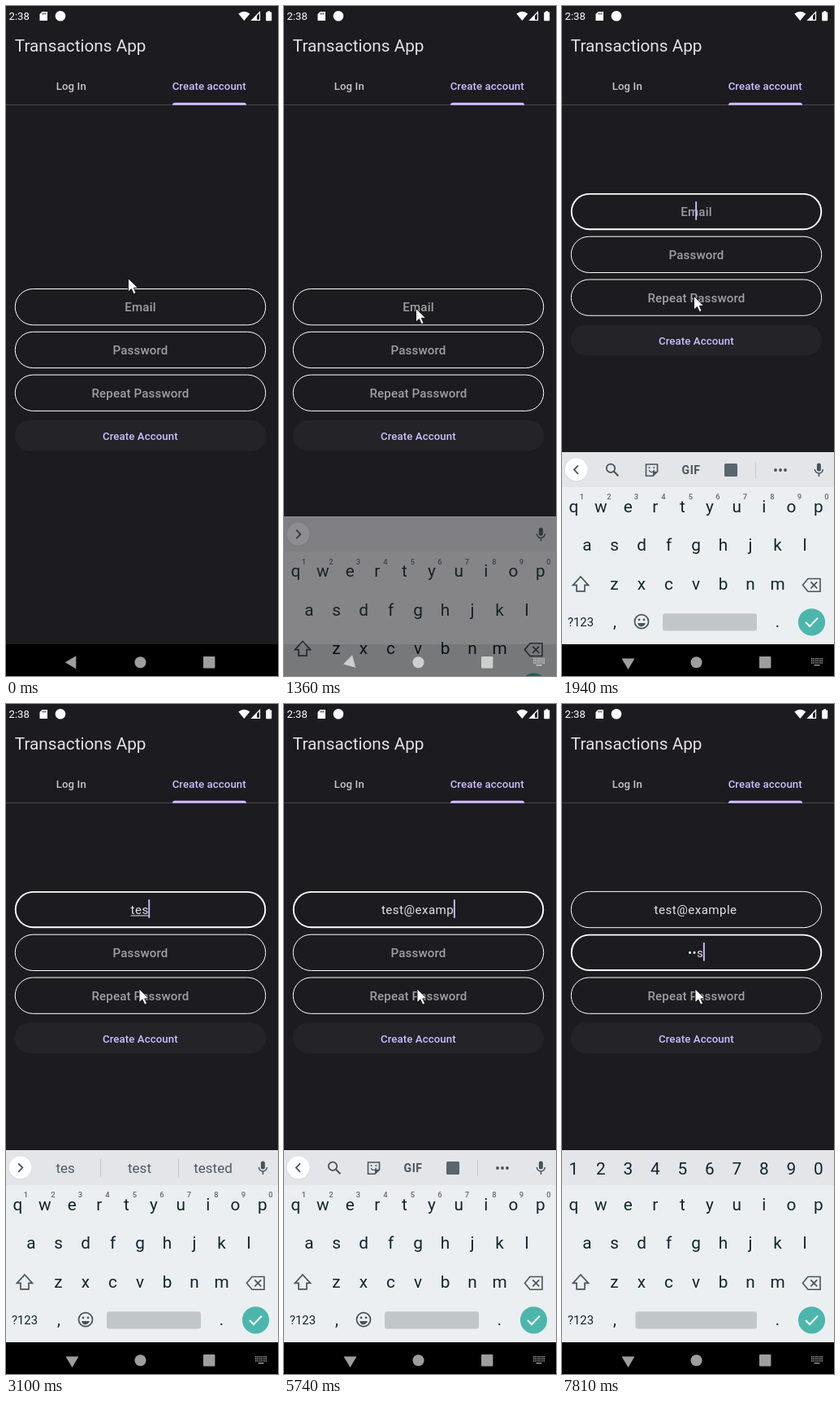
An HTML page with a canvas for the animation above (7.99 s loop, 335 px wide and 823 px high).

```html
<!DOCTYPE html>
<html lang="en">
<head>
<meta charset="utf-8">
<title>Create account</title>
<style>
html, body { margin: 0; width: 100%; height: 100%; overflow: hidden; background: #1c1b1f; }
canvas { display: block; width: 335px; height: 823px; }
</style>
</head>
<body>
<canvas id="stage"></canvas>
<script>
const W = 335, H = 823, LOOP = 7990;
const DP = 0.944;
const BG = '#1c1b1f', ACCENT = '#d0bcff', INK = '#10252e', ICON = '#46545b';
const NAV_TOP = 784, KB_TOP = 548;
const KB_START = 1300, FOCUS = 1630, PASS_FOCUS = 6570;

const canvas = document.getElementById('stage');
const ratio = window.devicePixelRatio || 1;
canvas.width = W * ratio;
canvas.height = H * ratio;
const c = canvas.getContext('2d');

const emailKeys = [2640, 2880, 3100, 3355, 4440, 4790, 5170, 5270, 5460, 5735, 5960, 6060];
const passKeys = [7370, 7530, 7805];
const EMAIL = 'test@example', PASS = 'tes';

const pointer = [
  [20, 150, 334], [400, 164, 368], [600, 168, 372], [780, 156, 364],
  [830, 152, 360], [1150, 162, 371], [1640, 162, 371],
  [1940, 162, 356], [2040, 163.5, 349.5]
];

const ramp = (t, a, b) => Math.min(1, Math.max(0, (t - a) / (b - a)));
const typed = (keys, t) => keys.filter(k => t >= k).length;

function text(s, x, y, size, color, o = {}) {
  c.font = `${o.weight || 400} ${size}px Roboto, sans-serif`;
  c.letterSpacing = (o.space || 0) + 'px';
  c.textAlign = 'left';
  c.fillStyle = color;
  const w = c.measureText(s).width;
  c.fillText(s, o.left ? x : x - w / 2, y);
  return w;
}

function box(x, y, w, h, r, fill, stroke, line) {
  c.beginPath();
  c.roundRect(x, y, w, h, r);
  if (fill) { c.fillStyle = fill; c.fill(); }
  if (stroke) { c.strokeStyle = stroke; c.lineWidth = line; c.stroke(); }
}

function disc(x, y, r, fill) {
  c.beginPath();
  c.arc(x, y, r, 0, 7);
  c.fillStyle = fill;
  c.fill();
}

function poly(points, fill, stroke, line, open) {
  c.beginPath();
  points.forEach(([x, y], i) => i ? c.lineTo(x, y) : c.moveTo(x, y));
  if (!open) c.closePath();
  if (fill) { c.fillStyle = fill; c.fill(); }
  if (stroke) { c.strokeStyle = stroke; c.lineWidth = line; c.stroke(); }
}

function arc(x, y, r, a, b, color, line) {
  c.beginPath();
  c.arc(x, y, r, a, b);
  c.strokeStyle = color;
  c.lineWidth = line;
  c.stroke();
}

function faded(alpha, draw) {
  if (alpha <= 0) return;
  c.save();
  c.globalAlpha = alpha;
  draw();
  c.restore();
}

function header() {
  text('2:38', 3.5, 17.2, 14 * DP, '#fff', { left: true });
  poly([[44.5, 7], [51, 7], [51, 18], [41.5, 18], [41.5, 10]], '#fff');
  for (let i = 0; i < 3; i++) box(44.6 + i * 1.9, 8.2, 0.9, 2.4, 0, BG);
  disc(67, 12.3, 6.3, '#fff');
  c.beginPath();
  c.moveTo(293.3, 18);
  c.lineTo(286.3, 9.4);
  c.quadraticCurveTo(293.3, 4.2, 300.3, 9.4);
  c.closePath();
  c.fillStyle = '#fff';
  c.fill();
  poly([[312.5, 7.5], [312.5, 17.3], [302.8, 17.3]], null, '#fff', 1.2);
  poly([[309, 11], [309, 17.3], [302.8, 17.3]], '#fff');
  box(320.2, 7.6, 7, 10.6, 0.8, '#fff');
  box(322.2, 6.2, 3, 2, 0.3, '#fff');

  text('Transactions App', 10.8, 56.3, 22 * DP, '#e6e1e5', { left: true });
  const tab = { weight: 500, space: 0.1 };
  text('Log In', 80.3, 102.8, 14 * DP, '#cac4d0', tab);
  text('Create account', 250.2, 102.8, 14 * DP, ACCENT, tab);
  box(0, 121, W, 1, 0, '#49454f');
  box(205, 118.8, 91, 3, [3, 3, 0, 0], ACCENT);
}

function field(y, hint, value, focused, caret, underline) {
  const line = focused ? 1.9 : 1;
  box(10.8 + line / 2, y + line / 2, 309.4 - line, 45.3 - line, 22, null, '#fff', line);
  let w = 0;
  if (value) {
    w = text(value, 164.6, y + 28, 16 * DP, '#e6e1e5', { space: 0.47 });
    if (underline) box(164.6 - w / 2, y + 29.6, w, 1, 0, '#e6e1e5');
  } else {
    text(hint, 165.5, y + 28, 16 * DP, '#a09ea3', { weight: 500, space: 0.14 });
  }
  if (caret) box(164.2 + w / 2, y + 10.3, 1.9, 22.6, 0, ACCENT);
}

function form(t) {
  const top = t < FOCUS ? 347 : 229.9;
  const n = typed(emailKeys, t), m = typed(passKeys, t);
  const onPass = t >= PASS_FOCUS, onEmail = t >= FOCUS && !onPass;
  const last = onPass ? (m ? passKeys[m - 1] : PASS_FOCUS) : (n ? emailKeys[n - 1] : FOCUS + 10);
  const blink = (t - last) % 1000 < 510;
  const secret = m ? '•'.repeat(m - 1) + PASS[m - 1] : '';
  field(top, 'Email', EMAIL.slice(0, n), onEmail, onEmail && blink, n > 0 && n < 5);
  field(top + 52.8, 'Password', secret, onPass, onPass && blink);
  field(top + 105.6, 'Repeat Password', '');
  box(10.8, top + 161.7, 309.4, 37.7, 18.8, '#242328');
  text('Create Account', 165.3, top + 185.6, 14 * DP, ACCENT, { weight: 500, space: 0.1 });
}

function mic() {
  box(313.9, 561.5, 5, 10, 2.5, ICON);
  arc(316.4, 569, 5, 0, Math.PI, ICON, 1.5);
  box(315.7, 574, 1.5, 4, 0, ICON);
}

function tools() {
  arc(60, 567.8, 5.2, 0, 7, ICON, 1.8);
  poly([[63.8, 571.6], [69.3, 577.2]], null, ICON, 2.1, true);
  poly([[103.5, 563], [117.5, 563], [117.5, 572], [112, 577.3], [103.5, 577.3]], null, ICON, 1.6);
  poly([[117.5, 571.8], [112, 571.8], [112, 577.3]], ICON);
  disc(107.5, 567, 1, ICON);
  disc(113.3, 567, 1, ICON);
  arc(110.4, 569.3, 3.2, 0.2, 2.9, ICON, 1.3);
  text('GIF', 159, 574.8, 14, ICON, { weight: 700, space: 0.5 });
  box(200, 562, 16, 16, 1.5, '#59666d');
  box(238, 560, 1, 20, 0, '#c4c8cb');
  for (let i = -1; i < 2; i++) disc(269 + i * 6, 570, 1.9, ICON);
}

function words(n) {
  const sets = [['t', 'the', 'to'], ['te', 'the', 'tell'], ['tes', 'test', 'tested'], ['test', '', 'testing']];
  const [left, mid, right] = sets[Math.max(0, Math.min(n, 4) - 1)];
  const color = '#4c5a61';
  text(left, 73.2, 576, 17, color);
  text(right, 255, 576, 17, color);
  if (mid) text(mid, 164.5, 576, 17, color);
  else {
    text('test', 164.2, 562.6, 13.6, color);
    text('@abc.test', 164.2, 579, 11.8, color);
  }
  box(116, 559, 1, 22, 0, '#c4c8cb');
  box(212, 559, 1, 22, 0, '#c4c8cb');
}

function strip(t, nums) {
  const n = typed(emailKeys, t);
  const wordsOn = t >= 2680 && t < 4480;
  faded(1 - nums, () => {
    disc(17.6, 569.8, 14.4, '#c9cdd0');
    disc(17.6, 569.5, 14, '#fff');
    const d = t < 1420 || wordsOn ? 1 : -1;
    poly([[17.6 - d * 2.4, 564.4], [17.6 + d * 2.7, 569.6], [17.6 - d * 2.4, 574.8]], null, ICON, 1.8, true);
    mic();
  });
  const first = ramp(t, 1400, 1460) * (1 - ramp(t, 2640, 2690));
  const second = ramp(t, 4460, 4530) * (1 - nums);
  faded(Math.max(first, second), tools);
  faded(ramp(t, 2680, 2740) * (1 - ramp(t, 4430, 4490)), () => words(n));
}

function keys(t, nums) {
  const row = (s, x, y) => [...s].forEach((k, i) => text(k, x + i * 33.5, y, 22 * DP, INK));
  row('qwertyuiop', 14.3, 621.8);
  row('asdfghjkl', 31, 669.2);
  row('zxcvbnm', 64.5, 716.8);
  faded(nums, () => row('1234567890', 14.3, 578.4));
  faded(1 - nums, () => {
    [...'1234567890'].forEach((k, i) => text(k, 24.3 + i * 33.5, 606.3, 9.4, '#5c6a71', { weight: 500 }));
  });

  poly([[23, 701], [32.5, 711.3], [28, 711.3], [28, 718.8], [18, 718.8], [18, 711.3], [13.5, 711.3]], null, ICON, 1.7);
  poly([[296.5, 711.3], [303, 703.5], [318, 703.5], [318, 719.2], [303, 719.2]], null, ICON, 1.6);
  poly([[306.3, 707.3], [314.2, 715.4]], null, ICON, 1.7, true);
  poly([[314.2, 707.3], [306.3, 715.4]], null, ICON, 1.7, true);

  text('?123', 23, 762, 14.8, INK);
  text(',', 65, 763, 20, INK);
  text('.', 265.3, 763, 20, INK);
  faded(1 - nums, () => {
    arc(98, 756.2, 8.5, 0, 7, ICON, 1.7);
    disc(95, 753.8, 1.4, ICON);
    disc(101, 753.8, 1.4, ICON);
    c.beginPath();
    c.arc(98, 757.4, 4.8, 0.1, Math.PI - 0.1);
    c.fillStyle = ICON;
    c.fill();
  });
  const left = nums > 0.5 ? 90.5 : 124;
  box(left, 746.2, 240 - left, 21.2, 3, '#c1c6c9');
  disc(307.5, 756.8, 16.6, '#4db6ac');
  poly([[300, 757], [305, 762], [315, 751.8]], null, '#fff', 2, true);
}

function keyboard(t) {
  const dt = t - KB_START;
  if (dt <= 0) return;
  const drop = 125 * (1 - ramp(dt, 0, 300)) ** 2;
  const nums = ramp(t, 6640, 6740);
  const shade = 1 - Math.min(1, 0.34 + dt * 0.00267);
  c.save();
  c.translate(0, drop);
  box(0, KB_TOP, W, NAV_TOP - KB_TOP, 0, '#eceff1');
  box(0, KB_TOP, W, 43, 0, '#e3e5e9');
  strip(t, nums);
  keys(t, nums);
  // the backdrop is flat, so veiling the panel equals fading it in
  c.globalAlpha = shade;
  box(0, KB_TOP, W, NAV_TOP - drop - KB_TOP, 0, BG);
  if (drop > 0) box(0, NAV_TOP - drop, W, drop, 0, '#000');
  c.restore();
}

function navIcons(t) {
  const dt = t - KB_START;
  const glow = dt > 0 ? 1 - ramp(dt, 60, 170) : 0;
  const color = glow > 0 ? `rgb(${[0, 0, 0].map(() => Math.round(158 + 48 * glow))})` : '#9e9e9e';
  const turn = ramp(dt, 20, 260);
  c.save();
  c.translate(81.5, 806.2);
  c.rotate(-turn * Math.PI / 2);
  poly([[-8.8, 0], [4.8, -8], [4.8, 8]], color);
  c.restore();
  disc(165.5, 806.3, 7, color);
  box(243, 799, 14.4, 14.4, 0.8, color);
  if (dt > 0) {
    for (let r = 0; r < 3; r++)
      for (let i = 0; i < 6; i++) box(307 + i * 2.5, 801 + r * 2.6, 1.5, 1.6, 0, color);
    box(310.5, 809, 7, 1.4, 0, color);
  }
}

function mouse(t) {
  let [, x, y] = pointer[0];
  for (let i = 1; i < pointer.length; i++) {
    const [t0, x0, y0] = pointer[i - 1], [t1, x1, y1] = pointer[i];
    if (t < t0) break;
    const p = ramp(t, t0, t1);
    x = x0 + (x1 - x0) * p;
    y = y0 + (y1 - y0) * p;
  }
  c.save();
  c.translate(x + 0.5, y + 0.5);
  c.lineJoin = 'round';
  poly([[0, 0], [0, 16.6], [3.9, 13], [6.8, 19.2], [9.6, 18], [6.8, 11.9], [12, 11.7]], '#fff', '#000', 0.8);
  c.restore();
}

function frame(now) {
  const t = Math.max(0, now) % LOOP;
  c.setTransform(ratio, 0, 0, ratio, 0, 0);
  box(0, 0, W, H, 0, BG);
  header();
  form(t);
  box(0, NAV_TOP, W, H - NAV_TOP, 0, '#000');
  keyboard(t);
  navIcons(t);
  mouse(t);
  requestAnimationFrame(frame);
}
frame(performance.now());
</script>
</body>
</html>
```
